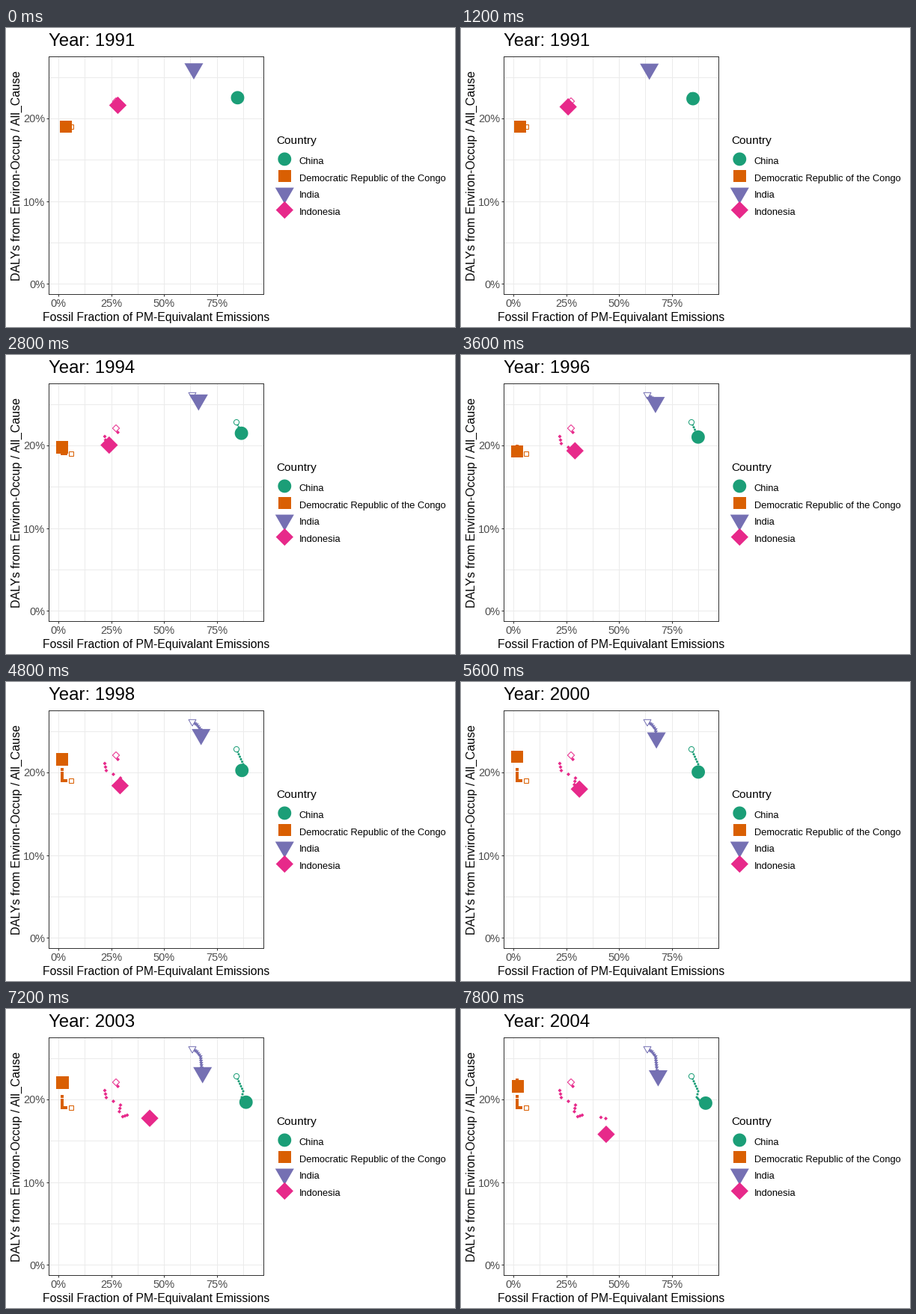
Animation of 600x400 px, one loop 8000 ms. Source, as a matplotlib script:

```python
import numpy as np
import matplotlib.pyplot as plt
from matplotlib.animation import FuncAnimation
from matplotlib.collections import PolyCollection
from matplotlib.patches import Polygon

W, H, DPI = 600, 400, 100
FRAMES, STEP_MS = 40, 200
HOLD = 5                # last frame of the opening pause
START, RATE = 0.98, 0.3805  # years since 1990 at the pause, years per frame
BIG, RING = 9.3, 3.7
GRID, INK, GREY = "#ebebeb", "#333333", "#4d4d4d"

plt.rcParams["font.family"] = "Liberation Sans"

# Unit outlines, y pointing down
turn = np.linspace(0, 2 * np.pi, 60, endpoint=False)
CIRCLE = 0.96 * np.column_stack([np.cos(turn), np.sin(turn)])
SQUARE = 0.886 * np.array([(-1, -1), (1, -1), (1, 1), (-1, 1)])
TRIANGLE = np.array([(-1.347, -0.778), (1.347, -0.778), (0, 1.555)])
DIAMOND = 1.253 * np.array([(0, -1), (1, 0), (0, 1), (-1, 0)])

# name, colour, outline, dot size, turning points (years since 1990, x, y)
COUNTRIES = [
    ("China", "#1b9e77", CIRCLE, 1.6,
     [(0, 308, 90), (6, 317, 110), (8, 315, 118), (13, 321, 125), (14, 327.5, 126)]),
    ("Democratic Republic of the Congo", "#d95f02", SQUARE, 2.4,
     [(0, 87, 132), (1, 80, 132), (3, 75, 132), (4, 75, 122), (6, 75, 129.5),
      (8, 75, 104), (12, 75, 95), (14, 76, 104)]),
    ("India", "#7570b3", TRIANGLE, 2,
     [(0, 249, 53.2), (3, 255, 57), (6, 260, 63.5), (11, 261.5, 78.5), (14, 263.5, 89.5)]),
    ("Indonesia", "#e7298a", DIAMOND, 2,
     [(0, 147, 98), (1, 149.5, 103.5), (2, 132, 109), (4, 134, 118.5), (6, 153, 128.5),
      (8, 151.5, 137.3), (9, 156, 144), (11, 162, 142), (12, 187, 145),
      (13, 193.5, 146.5), (14, 194, 169.5)]),
]

fig = plt.figure(figsize=(W / DPI, H / DPI), dpi=DPI, facecolor="white")
ax = fig.add_axes([0, 0, 1, 1])
ax.set_xlim(0, W)
ax.set_ylim(H, 0)
ax.axis("off")


def px(n):
    return n * 72 / DPI


def line(x0, y0, x1, y1, color, z, width=1):
    """Crisp line through the centres of whole pixels."""
    ax.plot([x0 + 0.5, x1 + 0.5], [y0 + 0.5, y1 + 0.5], color=color, lw=px(width),
            zorder=z, solid_capstyle="butt", snap=False)


def label(x, y, text, size, color="black", ha="left", rotation=0):
    return ax.text(x, y, text, fontsize=px(size), color=color, ha=ha, va="baseline",
                   rotation=rotation, rotation_mode="anchor")


def place(path, year):
    years, xs, ys = zip(*path)
    return np.array([np.interp(year, years, xs), np.interp(year, years, ys)])


def add_marker(outline, spot, size, z, fc, ec="none"):
    patch = Polygon(outline * size + spot, closed=True, fc=fc, ec=ec,
                    lw=0 if ec == "none" else px(1), zorder=z)
    return ax.add_patch(patch)


def draw_panel():
    left, right, top, bottom = 57, 344, 38, 356
    for i in range(8):
        x = round(70 + i * 35.3)
        line(x, top, x, bottom, GRID, 0)
        if i % 2 == 0:
            line(x, bottom, x, bottom + 3, INK, 1)
            label(x, 373, f"{i // 2 * 25}%", 14.5, GREY, "center")
    for i in range(6):
        y = round(342.3 - i * 55.3)
        line(left, y, right, y, GRID, 0)
        if i % 2 == 0:
            line(left - 3, y, left, y, INK, 1)
            label(52.3, y + 5.5, f"{i // 2 * 10}%", 14.5, GREY, "right")
    for x in (left, right):
        line(x, top - 0.5, x, bottom + 0.5, INK, 8)
    for y in (top, bottom):
        line(left - 0.5, y, right + 0.5, y, INK, 8)
    label(201, 392, "Fossil Fraction of PM-Equivalant Emissions", 15.7, ha="center")
    label(19, 197, "DALYs from Environ-Occup / All_Cause", 16, ha="center", rotation=90)


def draw_legend():
    label(361, 155, "Country", 15.4)
    for i, (name, color, outline, *_) in enumerate(COUNTRIES):
        y = 175.4 + i * 22.7
        add_marker(outline, (372.3, y), BIG, 5, color)
        label(391.7, y + 6.5, name, 12.95)


draw_panel()
draw_legend()
title = label(57, 24.5, "", 24)

heads, trails = [], []
for _, color, outline, _, path in COUNTRIES:
    trail = PolyCollection([], facecolors=color, edgecolors="none", zorder=3)
    trails.append(ax.add_collection(trail, autolim=False))
    add_marker(outline, place(path, 0), RING, 4, "white", color)
    heads.append(add_marker(outline, place(path, 0), BIG, 6, color))


def update(frame):
    year = START + RATE * max(frame - HOLD, 0)
    title.set_text(f"Year: {1990 + round(year)}")
    for (_, _, outline, dot, path), head, trail in zip(COUNTRIES, heads, trails):
        head.set_xy(outline * BIG + place(path, year))
        trail.set_verts([outline * dot + place(path, y) for y in range(1, int(year) + 1)])
    return [title, *heads, *trails]


anim = FuncAnimation(fig, update, frames=FRAMES, init_func=lambda: update(0),
                     interval=STEP_MS, repeat=True, repeat_delay=0, blit=False)
plt.show()
```
